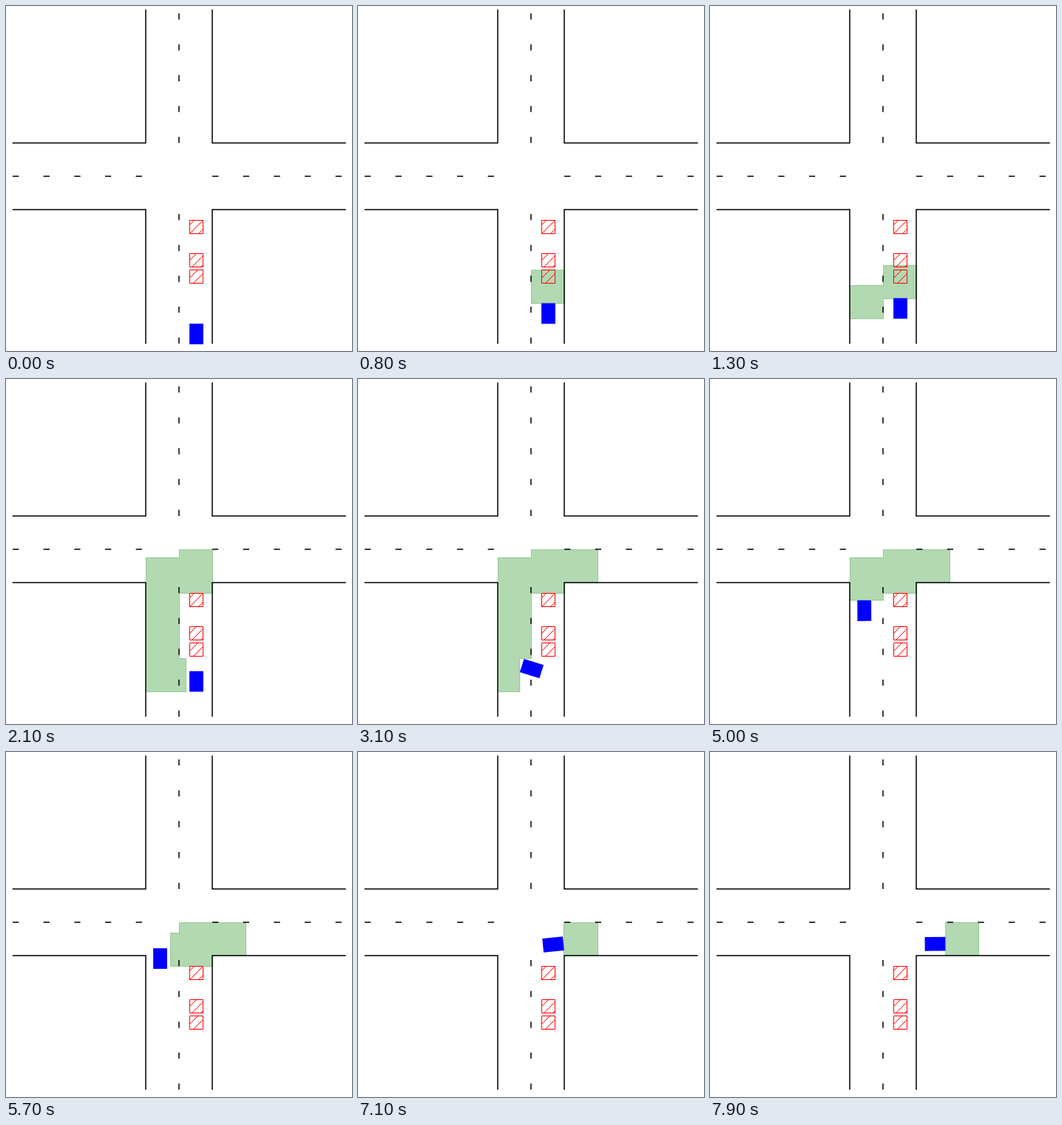
An HTML page that plays this animation: 468 by 466 pixels, repeating every 8000 ms.

```html
<!DOCTYPE html>
<html lang="en">
<head>
<meta charset="utf-8">
<title>Crossing</title>
<style>
html, body { margin: 0; width: 100%; height: 100%; overflow: hidden; background: #fff; }
svg { display: block; width: 100%; height: 100%; }
</style>
</head>
<body>
<svg viewBox="0 0 468 466" fill="none">
  <path id="zone" fill="#008000" stroke="#008000" fill-opacity=".3" stroke-opacity=".3"/>
  <g stroke="#000" stroke-width="1.5">
    <path stroke-linecap="square" d="M189 5.5V185H9.5M279 5.5V185H459M189 455.5V275H9.5M279 455.5V275H459"/>
    <path stroke-dasharray="8.33 33.33" d="M234 185V5M234 456V275M9 230H189M279 230H459"/>
  </g>
  <g id="blocks" stroke="#f00"></g>
  <rect id="car" x="-13.9" y="-9.4" width="27.8" height="18.8" fill="#00f"/>
</svg>
<script>
const LOOP = 8000, STEP = 147, CELL = 45.25;
const LEFT = 189.5, MID = 234.5, RIGHT = 279.5;
const el = id => document.getElementById(id);
const mix = (a, b, u) => a + (b - a) * u;

// Obstacles share one diagonal hatch grid
function hatch(top) {
  const x0 = 248.5, size = 18, x1 = x0 + size, y1 = top + size;
  let d = `M${x0} ${top}h${size}v${size}h${-size}z`;
  for (let c = 544; c < x1 + y1; c += 12) {
    if (c <= x0 + top) continue;
    const a = Math.max(x0, c - y1), b = Math.min(x1, c - top);
    d += `M${a} ${c - a}L${b} ${c - b}`;
  }
  return `<path d="${d}"/>`;
}
el('blocks').innerHTML = [289.5, 334.5, 356.5].map(hatch).join('');

const box = (x0, y0, x1, y1) => `M${x0} ${y0}H${x1}V${y1}H${x0}Z`;

function bezier(p, u) {
  const v = 1 - u;
  const at = i => v * v * v * p[0][i] + 3 * v * v * u * p[1][i] + 3 * v * u * u * p[2][i] + u * u * u * p[3][i];
  const slope = i => v * v * (p[1][i] - p[0][i]) + 2 * v * u * (p[2][i] - p[1][i]) + u * u * (p[3][i] - p[2][i]);
  return { x: at(0), y: at(1), a: Math.atan2(slope(1), slope(0)) };
}
const UP = -Math.PI / 2;
const laneChange = [[257.5, 408.5], [257, 388], [214, 394], [209.2, 374]];
const rightTurn = [[208.5, 279], [208.5, 262], [244, 262], [264, 260]];

function carAt(t, n) {
  if (t < 2600) {
    const k = Math.min(5, Math.max(0, Math.floor((t - 300) / STEP) + 1));
    return { x: 257.5, y: 443 - 6.9 * k, a: UP };
  }
  if (n < 7) return bezier(laneChange, (n + 1) / 8);
  if (n < 21) {
    const u = (n - 7) / 14;
    return { x: mix(209.2, 208.5, u), y: mix(374, 279, u), a: UP - 0.12 * Math.exp(7 - n) - 0.015 * (1 - u) };
  }
  if (n < 30) return bezier(rightTurn, (n - 21) / 9);
  return { x: 264 + (n - 30) * 6.75, y: 259.2 + 0.8 * Math.exp((30 - n) / 2), a: -0.1 * Math.exp((30 - n) / 2) };
}

// Corridor search while the car waits
function searchZone(t, front) {
  if (t < 300) return '';
  const ahead = box(MID, front - CELL, RIGHT, front);
  if (t < 1100) return ahead;
  if (t < 1300) return ahead + box(MID, 244.2, RIGHT, 289.5);
  if (t < 1500) return `M${LEFT} 377.5H${MID}V350.5H${RIGHT}V395.5H${MID}V422.5H${LEFT}Z`;
  const cells = [1700, 1800, 2000].filter(s => t >= s).length;
  return fullZone(377.5 - cells * 45.4, t >= 2100, t >= 2300, 243.5, 422.5);
}

function fullZone(top, corner, arm, foot, bottom) {
  let d = `M${LEFT} ${top}H${MID}`;
  if (corner) d += arm ? `V230.5H324.5V275H${RIGHT}V289.5H${MID}` : `V230.5H${RIGHT}V289.5H${MID}`;
  return d + (bottom > 377.5 ? `V377.5H${foot}V${bottom}` : `V${bottom}`) + `H${LEFT}Z`;
}

function driveZone(n, car) {
  const ca = Math.abs(Math.cos(car.a)), sa = Math.abs(Math.sin(car.a));
  const halfW = 13.9 * ca + 9.4 * sa, halfH = 13.9 * sa + 9.4 * ca;
  if (n < 5) return fullZone(241.3, true, true, Math.min(243.5, car.x - halfW), 422.5);
  if (n < 20) return fullZone(241.3, true, true, MID, Math.min(377.5, car.y - halfH));
  if (n < 22) return `M222.5 244.5H${MID}V230.5H324.5V275H${RIGHT}V289.5H222.5Z`;
  const x = Math.max(MID, car.x + 13.9);
  if (x < 275) return `M${x} 230.5H324.5V275H${RIGHT}V289.5H${x}Z`;
  return box(x + 0.3, 230.5, Math.max(324.5, x + CELL), 275);
}

function draw(time) {
  const t = Math.floor(time % LOOP / 100) * 100;
  const n = Math.floor((t - 2600) / STEP);
  const car = carAt(t, n);
  el('car').setAttribute('transform', `translate(${car.x} ${car.y}) rotate(${car.a * 180 / Math.PI})`);
  el('zone').setAttribute('d', t < 2600 ? searchZone(t, car.y - 13.4) : driveZone(n, car));
}

const start = performance.now();
function tick() {
  draw(performance.now() - start);
  requestAnimationFrame(tick);
}
tick();
</script>
</body>
</html>
```
